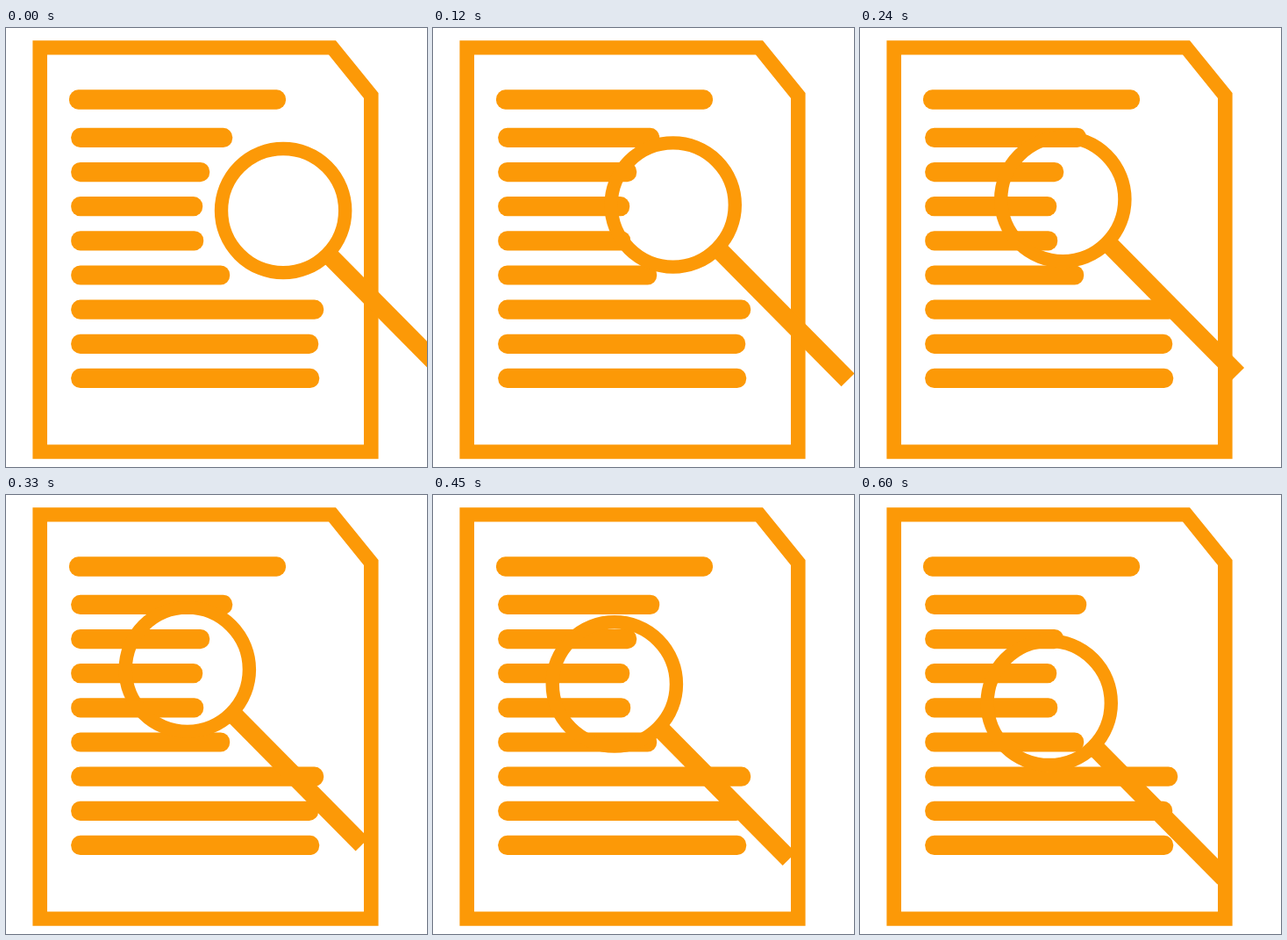
Animation, 480 px wide and 500 px high, one loop 930 ms. Source, as an HTML page:

```html
<!DOCTYPE html>
<html>
<head>
<meta charset="utf-8">
<style>
  html, body { margin: 0; width: 100%; height: 100%; overflow: hidden; background: #fff; }
  svg { display: block; }
</style>
</head>
<body>
<svg width="480" height="500" viewBox="0 0 480 500" fill="#fc9907">
  <path fill-rule="evenodd" d="M30.4 14.3H376L424.6 74V490.8H30.4ZM47 30.5V474.5H408V80L368 30.5Z"/>
  <rect x="72" y="70.3" width="247" height="22.4" rx="10.5"/>
  <g id="lines"></g>
  <g id="glass" fill="none" stroke="#fc9907">
    <circle r="70.6" stroke-width="15.4"/>
    <path d="M52.5 51L199.3 199.3" stroke-width="21"/>
  </g>
</svg>
<script>
const STEP = 30, LOOP = 930;
const BEND_IN = 8, BEND_OUT = 13, LAST = 20;

// Evenly spaced text lines, given by their widths
const widths = [184, 158, 150, 151, 181, 288, 282, 283];
document.getElementById('lines').innerHTML = widths
  .map((w, i) => `<rect x="74.2" y="${113.8 + 39.15 * i}" width="${w}" height="22.2" rx="10.5"/>`)
  .join('');

// Two straight legs joined by a cubic bend; all values are per axis
function travel(step, enter, speedIn, exit, speedOut) {
  if (step <= BEND_IN) return enter + speedIn * (step - BEND_IN);
  if (step >= BEND_OUT) return exit + speedOut * (step - BEND_OUT);
  const span = BEND_OUT - BEND_IN, s = (step - BEND_IN) / span, r = 1 - s;
  const c1 = enter + speedIn * span / 3, c2 = exit - speedOut * span / 3;
  return r ** 3 * enter + 3 * r * r * s * c1 + 3 * r * s * s * c2 + s ** 3 * exit;
}

const glass = document.getElementById('glass');
const start = performance.now();

function draw(now) {
  const t = Math.max(0, now - start) % LOOP;
  const step = Math.min(LAST, Math.floor(t / STEP));
  const x = travel(step, 231.3, -10.6, 203.3, 1.77);
  const y = travel(step, 195, -1.63, 206.8, 4.3);
  glass.setAttribute('transform', `translate(${x} ${y})`);
  requestAnimationFrame(draw);
}
draw(start);
</script>
</body>
</html>
```
